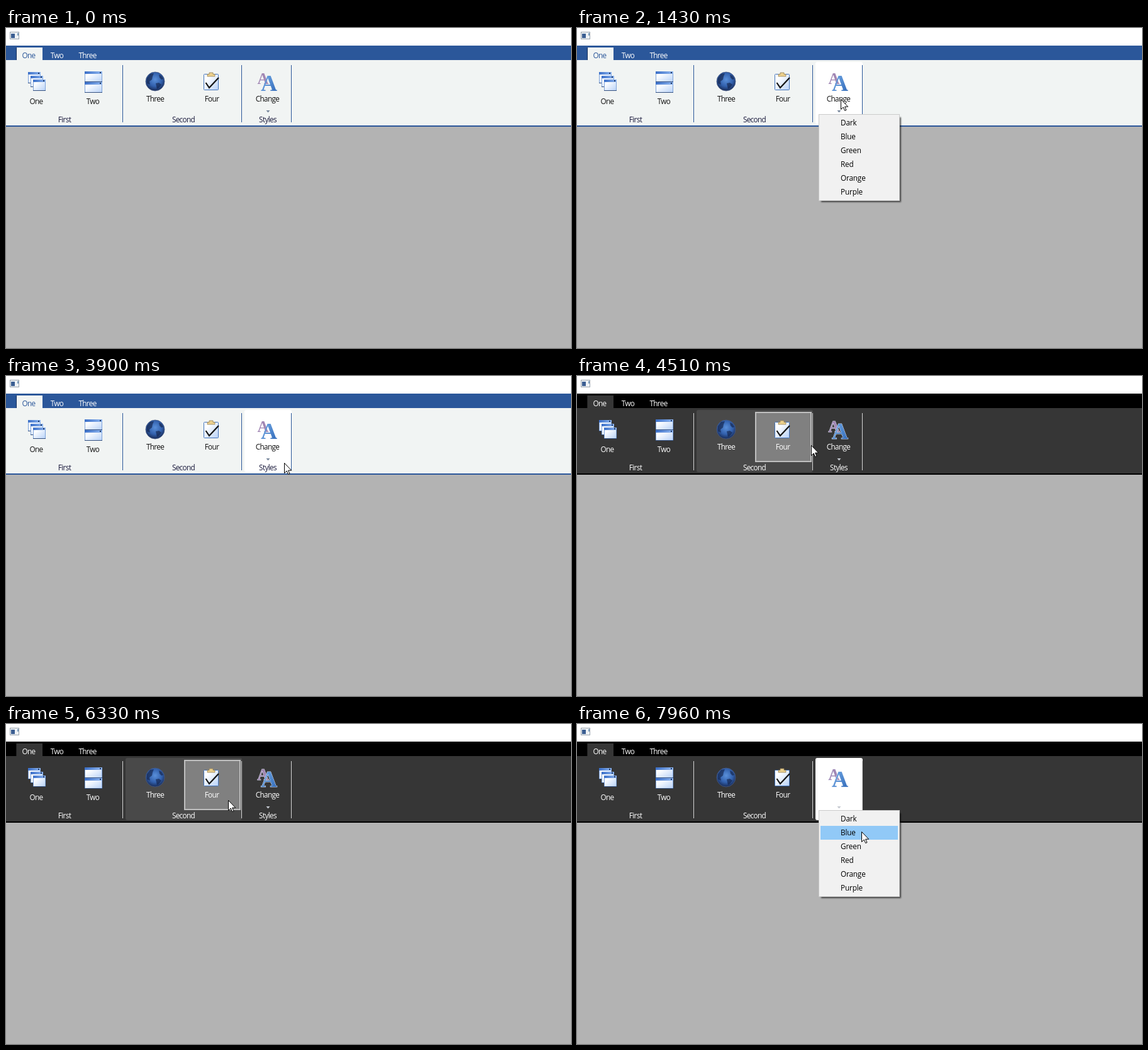
Write an HTML page that moves like this. It is 898x509 px and loops after 8 s.

```html
<!DOCTYPE html>
<html lang="en">
<head>
<meta charset="utf-8">
<title>Ribbon themes</title>
<style>
html, body { margin: 0; width: 100%; height: 100%; overflow: hidden; }
svg {
  display: block; width: 898px; height: 509px; cursor: default;
  font-family: "Open Sans", "Noto Sans", sans-serif; font-size: 11.75px;
  --strip: #2b579a; --body: #f1f4f3; --text: #111; --tab: #2b579a; --group: #1a1a3c;
  --sep: #2b579a; --edge: #16305c; --panel: #fff; --arrow: #78879c;
  --hot: #d5e1f2; --hotEdge: #a3bde3; --down: #a3bde3; --halo: none;
}
svg.dark {
  --strip: #000; --body: #363636; --text: #fff; --tab: #fff; --group: #fff;
  --sep: #d4d4d4; --edge: #202020; --panel: #494949; --arrow: #c4c8d0;
  --hot: #808080; --hotEdge: #c0c0c0; --down: #606060; --halo: #dfe6f4;
}
.strip { fill: var(--strip); }
.body { fill: var(--body); }
.ribbon text { fill: var(--text); text-anchor: middle; letter-spacing: -.65px; }
.ribbon .on { fill: var(--tab); }
.ribbon .white { fill: #fff; }
.ribbon .group { fill: var(--group); }
.sep { fill: var(--sep); }
#panel { fill: var(--panel); }
#panel.light { fill: #fff; }
#button { fill: var(--hot); stroke: var(--hotEdge); stroke-width: 2; }
#button.down { fill: var(--down); }
.ribbon text.letter {
  font-family: "Liberation Serif", serif; font-weight: bold; letter-spacing: 0;
  stroke: var(--halo); paint-order: stroke;
}
#menu text { fill: #000; letter-spacing: -.15px; }
</style>
</head>
<body>
<svg id="stage" viewBox="0 0 898 509">
  <defs>
    <linearGradient id="pane" x1="0" y1="0" x2="1" y2="1">
      <stop offset=".25" stop-color="#fff"/><stop offset="1" stop-color="#b8d2f8"/>
    </linearGradient>
    <linearGradient id="bar">
      <stop offset="0" stop-color="#3b6fc8"/><stop offset="1" stop-color="#8fb6f0"/>
    </linearGradient>
    <radialGradient id="sea" cx=".5" cy=".4" r=".6">
      <stop offset="0" stop-color="#5a90da"/><stop offset=".6" stop-color="#3260ac"/><stop offset="1" stop-color="#172a56"/>
    </radialGradient>
    <linearGradient id="ink" x1="0" y1="0" x2="1" y2="1">
      <stop offset="0" stop-color="#7db4ee"/><stop offset="1" stop-color="#2b64b4"/>
    </linearGradient>
    <filter id="soft" x="-10%" y="-10%" width="120%" height="120%"><feGaussianBlur stdDeviation="1.3"/></filter>
  </defs>

  <rect width="898" height="509" fill="#b3b3b3"/>
  <rect width="898" height="28" fill="#fff"/>
  <g>
    <rect x="6.5" y="6.5" width="14" height="11" fill="#eef2f5" stroke="#99a3ad"/>
    <rect x="8" y="9" width="6" height="7" fill="#3c5f92"/>
    <rect x="18" y="8" width="2" height="4" fill="#7fa0c0"/>
  </g>
  <rect class="strip" y="28" width="898" height="129"/>
  <rect class="body" y="51" width="898" height="104"/>
  <rect class="body" x="17" y="31" width="41" height="21"/>
  <rect x="16" y="31" width="1" height="20" fill="var(--edge)"/>

  <g class="ribbon">
    <rect id="panel" y="54" height="99" rx="3"/>
    <g id="seps"></g>
    <rect id="button" y="58" height="78"/>
    <g id="icons"></g>
    <g transform="translate(237 85)">
      <circle r="15" fill="url(#sea)" stroke="#4a5c84" stroke-width=".8"/>
      <path d="M-13-5-8-12-2-13-4-8-5-3-9 0-8 5-13 3ZM6-11 10-9 13-4 10-3 7-6ZM1 3 6 2 10 5 6 10 3 12Z" fill="#14234a" opacity=".65"/>
    </g>
    <g>
      <rect x="314.5" y="73.5" width="23" height="25" rx="1" fill="url(#pane)" stroke="#4374ba"/>
      <path d="M320 77V73.5H323V71H329V73.5H332V77Z" fill="#ecd08c" stroke="#94805a" stroke-width=".8"/>
      <path d="M317.5 87 323 95 338 79" fill="none" stroke="#141414" stroke-width="2.2"/>
    </g>
    <text class="letter" x="408.5" y="89" font-size="25" style="fill:#a287b4">A</text>
    <text class="letter" x="418" y="100" font-size="36" style="fill:url(#ink)">A</text>
    <path d="M413.5 131H419.5L416.5 134.5Z" fill="var(--arrow)"/>
    <g id="labels"></g>
  </g>

  <g id="menu">
    <rect x="388" y="142" width="127" height="135" fill="#000" opacity=".6" filter="url(#soft)"/>
    <rect x="384.5" y="137.5" width="128" height="137" fill="#f1f1f1" stroke="#cbcbcb"/>
    <rect id="pick" x="387" width="123" height="22" fill="#91c9f7"/>
    <g id="items"></g>
  </g>
  <path id="mouse" d="M.5.5V16.5L4.2 13 6.7 18.5 9 17.5 6.6 12.2H11.7Z" fill="#fff" stroke="#000"/>
</svg>
<script>
const $ = id => document.getElementById(id);
const LOOP = 8000, STEP = 80, DARK_AT = 3990;
const CLICKS = [{ press: 1240, open: 1335, close: 3900 }, { press: 7020, open: 7105, close: LOOP }];

// mouse moves: start, end, x and y reached; it rests in between
const ENTRY = [760, 494];
const MOVES = [
  [200, 920, 412, 103], [1020, 1430, 419, 113], [3120, 3120, 423, 115], [3200, 3710, 451, 141],
  [3900, 4510, 372, 110], [4640, 5340, 164, 97], [5400, 5770, 48, 97],
  [5920, 6330, 353, 121], [6390, 6620, 413, 117], [6850, 7190, 417, 126], [7340, 7960, 452, 171]
];

const GROUPS = [
  { name: "First", x: 1, w: 185, size: 90, base: 121, buttons: ["One", "Two"] },
  { name: "Second", x: 190, w: 185, size: 90, base: 117, buttons: ["Three", "Four"] },
  { name: "Styles", x: 379, w: 75, size: 65, base: 117, buttons: ["Change"] }
];
const STYLES = GROUPS[2];
const ITEMS = ["Dark", "Blue", "Green", "Red", "Orange", "Purple"];
const ROW = 22;

const text = (s, x, y, cls = "") => `<text x="${x}" y="${y}" class="${cls}">${s}</text>`;
const pane = (x, y, w, h) =>
  `<rect x="${x + .5}" y="${y + .5}" width="${w - 1}" height="${h - 1}" fill="url(#pane)" stroke="#7fa3da"/>
   <rect x="${x}" y="${y}" width="${w}" height="4" fill="url(#bar)"/>
   <path d="M${x} ${y + h - .5}h${w}" stroke="#34507f"/>
   <rect x="${x + w - 4}" y="${y + 1}" width="2" height="2" fill="#21375f"/>`;

// buttons are centred in their group
const buttons = GROUPS.flatMap(g => g.buttons.map((name, i) => {
  const x = g.x + Math.ceil((g.w - g.size * g.buttons.length) / 2) + i * g.size;
  return { name, x, w: g.size, base: g.base };
}));

$("labels").innerHTML =
  text("One", 36, 48, "on") + text("Two", 81, 48, "white") + text("Three", 129.5, 48, "white") +
  buttons.map(b => text(b.name, b.x + b.w / 2 - 1, b.base)).join("") +
  GROUPS.map(g => text(g.name, g.x + g.w / 2 - .5, 150, "group")).join("");
$("items").innerHTML = ITEMS.map((s, i) => text(s, 419, 155 + ROW * i)).join("");
$("seps").innerHTML = GROUPS.map(g =>
  `<rect class="sep" x="${g.x + g.w - 1}" y="59" width="1" height="91"/>`).join("");
$("icons").innerHTML = [0, 1, 2].map(i => pane(35 + 4 * i, 70 + 6 * i, 20, 18)).join("") +
  pane(125, 69, 28, 17) + pane(125, 86, 28, 17);

const show = (el, on) => el.setAttribute("visibility", on ? "visible" : "hidden");
const under = (list, x) => list.find(o => x >= o.x && x < o.x + o.w);

function place(el, box, inset) {
  show(el, box);
  if (!box) return;
  el.setAttribute("x", box.x + inset);
  el.setAttribute("width", box.w - 2 * inset);
}

function mouseAt(t) {
  let [x, y] = ENTRY;
  for (const [start, end, toX, toY] of MOVES) {
    if (t < start) break;
    const n = Math.round((end - start) / STEP);
    const k = t >= end ? 1 : (Math.floor((t - start) / (end - start) * n) + 1) / (n + 1);
    x += (toX - x) * k;
    y += (toY - y) * k;
  }
  return [Math.round(x), Math.round(y)];
}

function draw(t) {
  const [x, y] = mouseAt(t);
  const click = CLICKS.find(c => t >= c.press && t < c.close);
  const open = click && t >= click.open;

  $("stage").classList.toggle("dark", t >= DARK_AT);
  show($("mouse"), t >= MOVES[0][0]);
  $("mouse").setAttribute("transform", `translate(${x} ${y})`);

  const group = open ? STYLES : y >= 54 && y < 153 && under(GROUPS, x);
  place($("panel"), group, 0);
  $("panel").classList.toggle("light", group === STYLES);
  place($("button"), !open && y >= 57 && y < 137 && under(buttons, x), 1);
  $("button").classList.toggle("down", !!click);

  show($("menu"), open);
  if (open) $("menu").setAttribute("opacity", t < click.open + STEP ? .6 : 1);
  const row = Math.floor((y - 140) / ROW);
  show($("pick"), open && x >= 387 && x < 510 && row >= 0 && row < ITEMS.length);
  $("pick").setAttribute("y", 140 + ROW * row);
}

let start;
function tick(now) {
  start ??= now;
  draw((now - start) % LOOP);
  requestAnimationFrame(tick);
}
draw(0);
requestAnimationFrame(tick);
</script>
</body>
</html>
```
